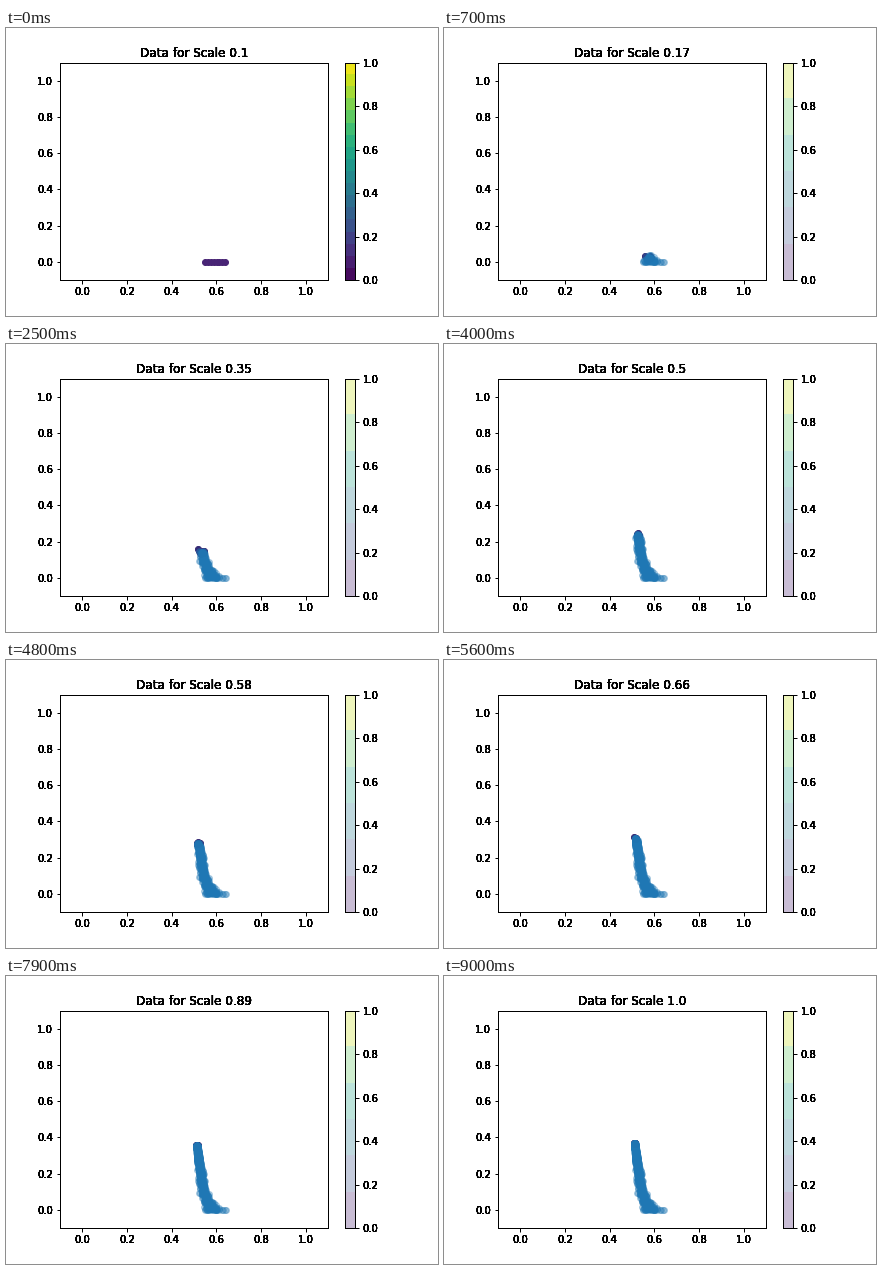
Animation, 432 px wide and 288 px high, one loop 9.1 s. Source, as a matplotlib script:

```python
import numpy as np
import matplotlib.pyplot as plt
from matplotlib.animation import FuncAnimation

FRAMES, STEP_MS = 91, 100
RUNS = 8
BLUE = "#1f77b4"
VIRIDIS = plt.get_cmap("viridis")

plt.rcParams.update({
    "font.family": "DejaVu Sans", "font.size": 10,
    "axes.linewidth": 1, "xtick.major.width": 1, "ytick.major.width": 1,
})


def heavy(text, passes=10):
    """Overdraw a text so its soft edges turn solid."""
    draw = text.draw

    def repeat(renderer):
        for _ in range(passes):
            draw(renderer)

    text.draw = repeat
    return text


def make_points():
    """Clouds of points that climb, drift left and tighten with the scale."""
    rng = np.random.default_rng(4)
    noise = np.clip(rng.normal(scale=.55, size=(2, FRAMES, RUNS)), -1.2, 1.2)
    noise[0, 0] = np.linspace(-1, 1, RUNS)

    t = np.arange(FRAMES)[:, None]
    height = .38 * (1 - np.exp(-(t / 40.5) ** 1.516))
    left = .37 - height
    center = .512 + .1 * left + .046 * np.exp(-height / .04)
    spread = .004 + .04 * left + .025 * np.exp(-height / .01)

    x = center + spread * noise[0]
    y = np.maximum(0, height + np.minimum(height, spread) * noise[1])
    return np.stack([x, y], axis=2)


def add_bands(ax, count, alpha):
    colors = VIRIDIS((np.arange(count) + .5) / count)[:, None, :3]
    return ax.imshow(colors, extent=(0, 1, 0, 1), origin="lower", aspect="auto",
                     interpolation="nearest", alpha=alpha)


points = make_points()

fig = plt.figure(figsize=(6, 4), dpi=72, facecolor="white")
ax = fig.add_axes([.125, .125, .62, .755])
ax.set(xlim=(-.1, 1.1), ylim=(-.1, 1.1))
cax = fig.add_axes([.78375, .125, .755 * 4 / 20 / 6, .755])
solid_bar = add_bands(cax, 18, 1)
pale_bar = add_bands(cax, 6, .3)
cax.set_xticks([])
cax.yaxis.tick_right()

for axis in (ax.xaxis, ax.yaxis, cax.yaxis):
    axis.set_ticks(np.linspace(0, 1, 6))
    axis.set_major_formatter("{x:.1f}")
    for tick in axis.get_major_ticks():
        heavy(tick.label1)
        heavy(tick.label2)

title = heavy(ax.set_title("", fontsize=12))
current = ax.scatter([], [], s=36, zorder=2)
history = ax.scatter([], [], s=36, color=BLUE, alpha=.3, zorder=3)


def update(i):
    title.set_text(f"Data for Scale {round(.1 + i / 100, 2)}")
    first = i == 0
    solid_bar.set_visible(first)
    pale_bar.set_visible(not first)
    current.set_offsets(points[i])
    current.set_color(VIRIDIS(.1 if first else 0.0))
    history.set_offsets(points[:i + 1].reshape(-1, 2))
    history.set_visible(not first)
    return title, solid_bar, pale_bar, current, history


anim = FuncAnimation(fig, update, frames=FRAMES, interval=STEP_MS,
                     repeat=True, repeat_delay=0, blit=False)
plt.show()
```
